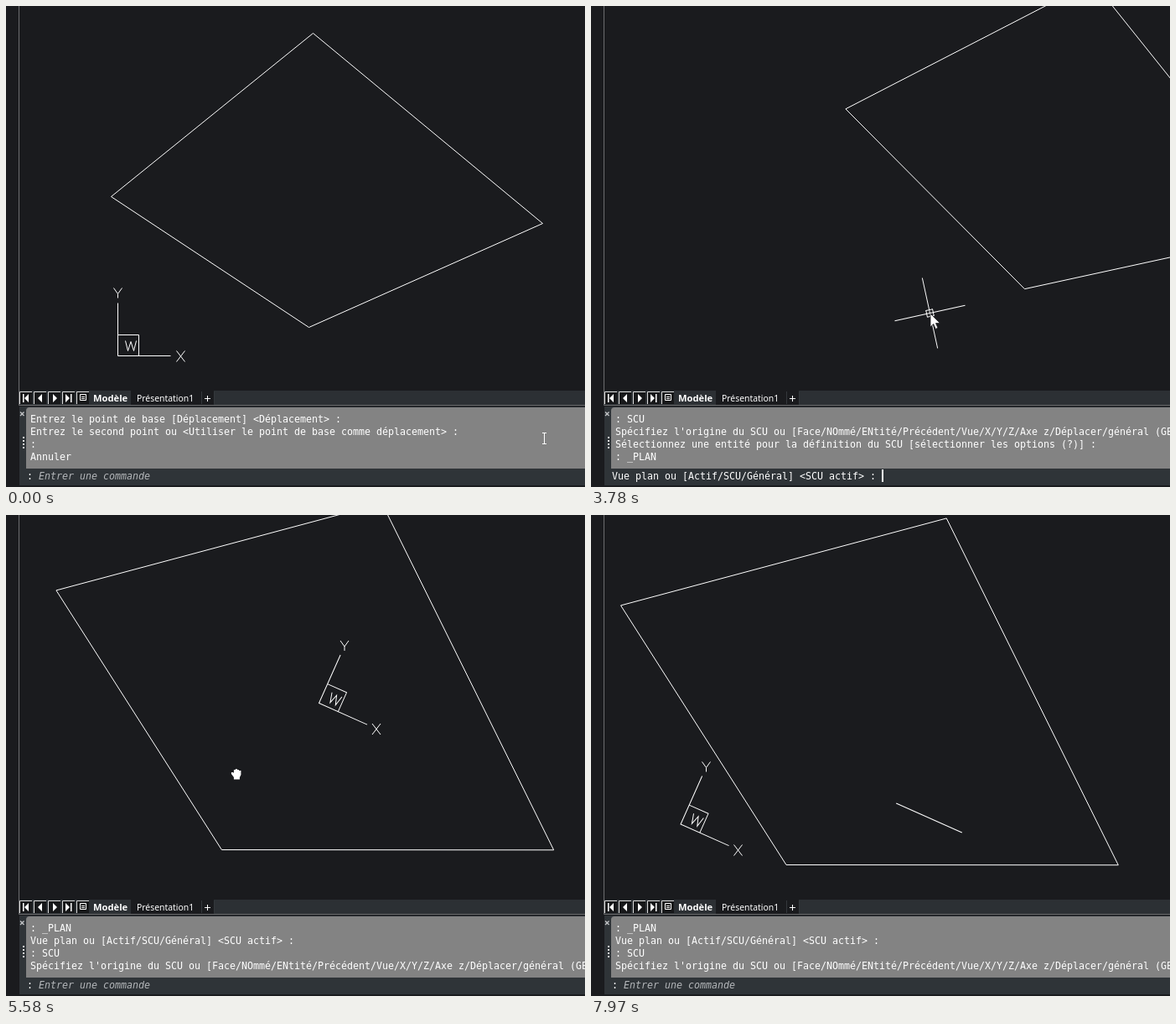
An HTML page for the animation above (8 s loop, 691 px wide and 574 px high).

```html
<!DOCTYPE html>
<html lang="fr">
<head>
<meta charset="utf-8">
<title>SCU et vue en plan</title>
<style>
  html, body { margin: 0; width: 100%; height: 100%; overflow: hidden; background: #1a1b1e; }
  svg { display: block; }
  .line { fill: none; stroke: #fff; stroke-width: 1; }
  .mono { font: 11.63px "DejaVu Sans Mono", monospace; fill: #fff; white-space: pre; }
  .hint { font-style: italic; fill: #b4b7ba; }
  .tab { font: 10.4px "Noto Sans", sans-serif; fill: #fff; }
  .active { font: bold 11.2px "Open Sans", sans-serif; }
</style>
</head>
<body>
<svg width="691" height="574" viewBox="0 0 691 574">
  <defs><clipPath id="view"><path d="M16 0H691V459H16Z"/></clipPath></defs>
  <rect width="691" height="574" fill="#1a1b1e"/>

  <g clip-path="url(#view)">
    <polygon id="shape" class="line"/>
    <g id="ucs" class="line">
      <g id="axes">
        <path d="M0 -63V0H63M0 -25H25V0"/>
        <path d="M9 -18L12 -6L15.5 -17L19 -6L22 -18"/>
      </g>
      <path id="labelX" d="M-5 -6L5 7M5 -6L-5 7"/>
      <path id="labelY" d="M-5 -6L0 1L5 -6M0 1V6"/>
    </g>
    <g id="cross" class="line">
      <path d="M-43 0H43"/>
      <path id="armY" d="M0 -43V43M-4 -4H4V4H-4Z"/>
    </g>
    <path id="arrow" d="M0 0V16L3.7 12.6L6.3 18.4L9 17.2L6.5 11.6H11.5Z" fill="#fff" stroke="#1a1b1e" stroke-width=".8"/>
    <path id="hand" fill="#fff" d="M-3 6.500V4L-6 0V-2H-4L-3 -1V-5H-1V-6H1V-5H3V-4H5.500V1L4 4V6.500Z"/>
  </g>

  <path d="M15.500 0V476.500H691" class="line" style="stroke:#6c6d6f"/>
  <path d="M16 459H691V476H16Z" fill="#2c3034"/>
  <path d="M149 459H248V476H149Z" fill="#1a1b1e"/>
  <path d="M233.500 460V475M248.500 460V475" class="line" style="stroke:#34383c"/>
  <g id="buttons"></g>
  <path fill="#fff" d="M20 463H21.500V473H20ZM27 463V473L22 468ZM43 463V473L38 468ZM56 463V473L61 468ZM71 463V473L76 468ZM77 463H78.500V473H77Z"/>
  <path d="M88.500 463.500H95.500V470.500H88.500ZM90 466.500H94M90 468.500H94" class="line"/>
  <text class="tab active" x="104" y="472">Modèle</text>
  <text class="tab" x="156" y="472">Présentation1</text>
  <path d="M237 468.500H244M240.500 465V472" class="line"/>

  <path d="M16 478H691V572H16Z" fill="#2f3438"/>
  <path d="M24 552V483Q24 479 28 479H691V552Z" fill="#838383"/>
  <path d="M17 484.500L21.500 489M21.500 484.500L17 489" stroke="#c4c6c8" stroke-width="1.400"/>
  <path d="M21 514V529" stroke="#ddd" stroke-width="2" stroke-dasharray="2 2"/>
  <g id="log" class="mono"></g>
  <text id="prompt" class="mono" x="25" y="565"></text>
  <text id="hint" class="mono hint" x="39" y="565">Entrer une commande</text>
  <path id="caret" d="M0 553V568" stroke="#fff" stroke-width="2"/>
  <path id="ibeam" class="line" d="M-2 -6.500H3M.5 -6V6M-2 6.500H3"/>
</svg>
<script>
const LOOP = 8000, RAD = Math.PI / 180;
const $ = id => document.getElementById(id);
const NS = 'http://www.w3.org/2000/svg';
const add = (parent, tag, attrs) => {
  const el = document.createElementNS(NS, tag);
  for (const k in attrs) el.setAttribute(k, attrs[k]);
  return parent.appendChild(el);
};
const show = (id, on) => { $(id).style.display = on ? '' : 'none'; };
const place = (id, [x, y], deg = 0) =>
  $(id).setAttribute('transform', `translate(${x} ${y}) rotate(${deg})`);

const ramp = (t, from, to) => Math.min(1, Math.max(0, (t - from) / (to - from)));
const mix = (a, b, p) => a.map((v, i) => v + (b[i] - v) * p);
const shift = (a, b) => a.map((v, i) => v + b[i]);
const current = (list, t) => list.filter(step => t >= step.at).pop();

for (let x = 16; x < 100; x += 17) {
  add($('buttons'), 'rect', { x, y: 460, width: 15, height: 15, fill: '#17181a' });
  add($('buttons'), 'path', { d: `M${x + .5} 475V460.500H${x + 15}`, class: 'line', style: 'stroke:#dcdcdc' });
}
const rows = [0, 1, 2, 3].map(i => add($('log'), 'text', { x: 29, y: 497 + 15 * i }));

// Quadrilateral relative to its lowest corner, which anchors the view
const corners = [[0, 0], [-236, -156], [5, -351], [279, -124]];
const TILT = 24, ZOOM = .298;
const HOME = [361, 383], PLANNED = [681, 289], PARKED = [197, 418], FINAL = [232.5, 417];
const drag = [
  { at: 4650, pos: PLANNED }, { at: 5130, pos: [554, 349] }, { at: 5400, pos: [322, 425] },
  { at: 5580, pos: [257, 399] }, { at: 6260, pos: PARKED }
];

// The plan view turns in two halves with a short pause between them
const turn = t => .4875 * ramp(t, 3300, 3780) + .5125 * ramp(t, 3930, 4280);

function anchor(t) {
  if (t < 4650) return mix(HOME, PLANNED, turn(t));
  if (t >= 6260) return mix(PARKED, FINAL, ramp(t, 6560, 6950) ** 1.4);
  const a = current(drag, t), b = drag[drag.indexOf(a) + 1];
  return mix(a.pos, b.pos, ramp(t, a.at, b.at));
}

// Each move runs straight from one point to another; a hand grips the drawing
const EDGE = [404, 366];
const moves = [
  { at: 0, kind: 'ibeam', from: [642, 516] },
  { at: 560, kind: 'cross', from: [654, 400], to: [735, 367], ms: 170 },
  { at: 730 },
  { at: 2370, kind: 'cross', from: [700, 30], to: EDGE, ms: 740 },
  { at: 3930, kind: 'cross', from: EDGE, to: [740, 216], ms: 380 },
  { at: 4310 },
  { at: 4650, kind: 'hand', grip: [18, -90] },
  { at: 6320, kind: 'cross', from: [226, 319] },
  { at: 6380, kind: 'hand', grip: [29, -92] },
  { at: 7130, kind: 'cross', from: [258, 317], to: [632, 244], ms: 170 },
  { at: 7320 },
  { at: 7880, kind: 'arm', from: [690, 376], to: [403, 361], ms: 90 }
];

const ORIGIN = "Spécifiez l'origine du SCU ou [Face/NOmmé/ENtité/Précédent/Vue/X/Y/Z/Axe z/Déplacer/général (GE)] <Général> :";
const PICK = 'Sélectionnez une entité pour la définition du SCU [sélectionner les options (?)] :';
const PLAN = 'Vue plan ou [Actif/SCU/Général] <SCU actif> :';
const dialog = [
  { at: 0, lines: ['Entrez le point de base [Déplacement] <Déplacement> :',
    'Entrez le second point ou <Utiliser le point de base comme déplacement> :', ':', 'Annuler'] },
  { at: 2340, lines: [':', ':', ':', ': SCU'] },
  { at: 2370, lines: [':', ':', ': SCU', ORIGIN], ask: PICK },
  { at: 3240, lines: [': SCU', ORIGIN, PICK, ': _PLAN'], ask: PLAN },
  { at: 4310, lines: [': _PLAN', PLAN, ': SCU', ORIGIN] }
];

let shown;
function drawDialog(t) {
  const step = current(dialog, t);
  if (step === shown) return;
  shown = step;
  const { lines, ask } = step;
  rows.forEach((row, i) => { row.textContent = lines[i]; });
  $('prompt').textContent = ask || ':';
  show('hint', !ask);
  show('caret', ask);
  if (ask) place('caret', [26 + 7 * (ask.length + 1), 0]);
}

const entityUcs = t => t >= 3240 && t < 4310;

function drawUcs(t, rot) {
  show('ucs', !entityUcs(t));
  const pos = t < 3240 ? [133.5, 417.5] : t < 6260 ? [373.5, 224.5] : [107, 369];
  const c = 75 * Math.cos(rot * RAD), s = 75 * Math.sin(rot * RAD);
  place('axes', pos, rot);
  place('labelX', shift(pos, [c, s]));
  place('labelY', shift(pos, [s, -c]));
}

function drawPointer(t, rot, base) {
  const { at, kind, from, to = from, ms = 1, grip } = current(moves, t);
  const cross = kind === 'cross' || kind === 'arm';
  show('ibeam', kind === 'ibeam');
  show('hand', kind === 'hand');
  show('cross', cross);
  show('armY', kind === 'cross');
  show('arrow', kind === 'cross' && t >= 3300 && t < 3960);
  if (!kind) return;
  const pos = grip ? shift(base, grip) : mix(from, to, ramp(t, at, at + ms));
  if (cross) {
    place('cross', shift(pos, [.5, .5]), entityUcs(t) ? rot - TILT : rot);
    place('arrow', shift(pos, [1, 1]));
  } else place(kind, pos);
}

function draw(t) {
  const p = turn(t), rot = TILT * p, scale = 1 + ZOOM * p * p;
  const base = anchor(t);
  const c = Math.cos(rot * RAD) * scale, s = Math.sin(rot * RAD) * scale;
  $('shape').setAttribute('points', corners.map(([x, y]) =>
    shift(base, [x * c - y * s + .5, x * s + y * c + .5])).join(' '));
  drawUcs(t, rot);
  drawPointer(t, rot, base);
  drawDialog(t);
}

const start = performance.now();
function frame() {
  draw((performance.now() - start) % LOOP);
  requestAnimationFrame(frame);
}
frame();
</script>
</body>
</html>
```
